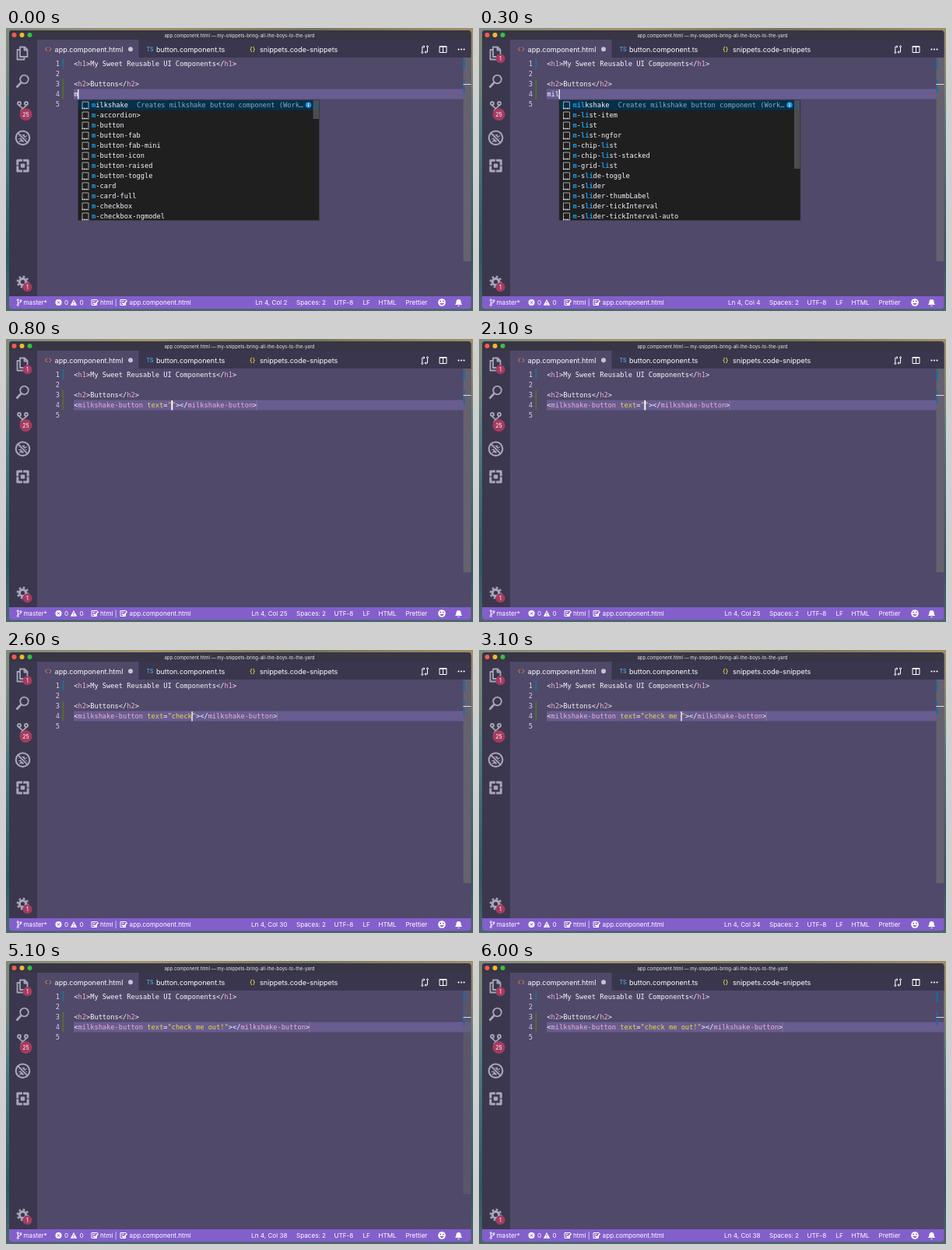
These frames come from a looping animation (600x364 px, 6100 ms). An HTML page:

```html
<!DOCTYPE html>
<html lang="en">
<head>
<meta charset="utf-8">
<title>Snippet typing</title>
<style>
  html, body { margin: 0; width: 100%; height: 100%; overflow: hidden; background: #39364b; }
  svg { display: block; width: 600px; height: 364px; }
  text { font-family: Inter, "Open Sans", sans-serif; fill: #fff; white-space: pre; }
  .code text, text.code { font: 8.68px "DejaVu Sans Mono", "Liberation Mono", monospace; fill: #f8f6fc; }
  .tabs text { font-size: 9px; }
  .status text { font-size: 8.15px; }
  .num text { fill: #d8d3e6; text-anchor: end; }
  .num .now { fill: #c9bdf0; }
  .tag { fill: #eeaed0; }
  .attr, .str { fill: #e8d740; }
  .hit { fill: #1c9be8; font-weight: bold; }
  .detail { fill: #86acc4 !important; }
  .icon { fill: none; stroke: #aaa6b8; stroke-width: 1.8; stroke-linejoin: round; }
  .thin { fill: none; stroke: #fff; stroke-width: 1; }
  .badge circle { fill: #a53b60; }
  .badge text { font-size: 7px; text-anchor: middle; }
</style>
</head>
<body>
<svg viewBox="0 0 600 364">
  <defs>
    <linearGradient id="sand" x2="1">
      <stop offset="0" stop-color="#7d8a78"/><stop offset=".3" stop-color="#a3936c"/>
      <stop offset=".65" stop-color="#757457"/><stop offset="1" stop-color="#a08f66"/>
    </linearGradient>
    <linearGradient id="sea" x2="0" y2="1">
      <stop offset="0" stop-color="#6f8780" stop-opacity="0"/><stop offset=".35" stop-color="#507b7e"/>
      <stop offset=".8" stop-color="#2b5960"/><stop offset="1" stop-color="#4d666e"/>
    </linearGradient>
    <clipPath id="win"><rect x="4" y="3" width="593.5" height="358" rx="4"/></clipPath>
    <g id="check" class="thin"><path d="M4 -3.5H-3.5V3.5H3V1M-2 -1.5H1M-2 1H-.5"/><path d="M-1 .5L1 2.5 5 -2.5" stroke-width="1.6"/></g>
    <g id="snip" fill="none" stroke="#e8e8e8"><path d="M.5 8V.5H8.5V8" stroke-dasharray="1.4 .7"/><path d="M0 9H9" stroke-width="1.5" stroke-dasharray="2 .6"/></g>
  </defs>
  <rect width="600" height="364" fill="url(#sand)"/>
  <rect width="600" height="364" fill="url(#sea)"/>

  <g clip-path="url(#win)">
    <rect width="600" height="364" fill="#504969"/>
    <rect width="600" height="15" fill="#383545"/>
    <rect x="170.5" y="15" width="430" height="23" fill="#3a364e"/>
    <rect y="15" width="40" height="331" fill="#3b374e"/>
    <rect y="345" width="600" height="19" fill="#835fcb"/>
  </g>
  <circle cx="10.5" cy="9" r="3" fill="#f45b53"/>
  <circle cx="20.5" cy="9" r="3" fill="#f3b92f"/>
  <circle cx="30.5" cy="9" r="3" fill="#35c143"/>
  <text x="300" y="11.6" font-size="6" text-anchor="middle" style="fill:#e9e7ee">app.component.html — my-snippets-bring-all-the-boys-to-the-yard</text>

  <g class="tabs">
    <path d="M53 24.5L50.5 27.2 53 30M55.5 24.5L58 27.2 55.5 30" fill="none" stroke="#e08a4a"/>
    <text x="62.6" y="30.5">app.component.html</text>
    <circle cx="160" cy="27.3" r="3" fill="#c6c2d2"/>
    <text x="180.5" y="30" style="font-size:7px;font-weight:600;fill:#4f9fd0">TS</text>
    <text x="193" y="30.5">button.component.ts</text>
    <text x="313" y="30" style="font-size:8px;font-weight:600;fill:#d8c844">{}</text>
    <text x="326" y="30.5">snippets.code-snippets</text>
  </g>
  <g class="thin">
    <path d="M537.5 24H534.8V30.5M538.5 31H541.5V25M536.5 22.5L538 24 536.5 25.5M539.5 29.5L538 31 539.5 32.5"/>
    <circle cx="534.8" cy="31.5" r="1"/><circle cx="541.5" cy="23.8" r="1"/>
    <path d="M557 23.5H566V31.5H557ZM561.5 23.5V31.5M557 24.2H566"/>
  </g>
  <g fill="#fff"><circle cx="581.5" cy="27.5" r="1.1"/><circle cx="585" cy="27.5" r="1.1"/><circle cx="588.5" cy="27.5" r="1.1"/></g>

  <g class="icon">
    <path d="M18 24.5H24L27.5 28V37H18ZM18 28H14.5V40.5H23.5V37M23.5 24.5V28.5H27.5"/>
    <circle cx="23.5" cy="66" r="5.3"/><path d="M19.5 70L13.5 76.5" stroke-width="2.6"/>
    <circle cx="17" cy="97" r="2"/><circle cx="26" cy="97" r="2"/><circle cx="21.5" cy="107" r="2"/>
    <path d="M17 99C17 102 21.5 101 21.5 105M26 99C26 102 21.5 101 21.5 105"/>
    <ellipse cx="21.5" cy="141.8" rx="2.4" ry="4" fill="#aaa6b8"/>
    <path d="M16 138.5L19 140M16 142.5H19M17 146.5L19.5 144.5M27 138.5L24 140M27 142.5H24M19.5 136.5L20.5 138M23.5 136.5L22.5 138" stroke-width="1.1"/>
    <path d="M15.8 135.5L27.2 147.1" stroke="#3b374e" stroke-width="4"/>
    <path d="M15.3 135L27.7 147.6"/><circle cx="21.5" cy="141.3" r="8.8" stroke-width="2.1"/>
    <path d="M14.8 170.3H28.2V184H14.8Z" stroke-width="3"/>
    <path d="M21.5 168V173M21.5 181V186M13 177H17M26 177H30" stroke="#3b374e" stroke-width="1.2"/>
    <path d="M20 175.6H23V178.6H20Z" fill="#aaa6b8" stroke-width="2.4"/>
    <circle cx="21.5" cy="326.5" r="4.2" stroke-width="3.2"/>
    <circle cx="21.5" cy="326.5" r="6.8" stroke-width="2.2" stroke-dasharray="2.7 2.64"/>
  </g>
  <g class="badge">
    <g id="dirty"><circle cx="27.5" cy="39.2" r="6"/><text x="27.5" y="41.8">1</text></g>
    <circle cx="25.5" cy="111.2" r="8"/><text x="25.5" y="113.8">25</text>
    <circle cx="27.5" cy="333.3" r="6"/><text x="27.5" y="335.9">1</text>
  </g>

  <rect x="87" y="78.5" width="510" height="13" fill="#685c90"/>
  <rect id="slider" x="587.5" y="38" width="10" height="262" fill="#66616f"/>
  <path d="M588.5 40V53" stroke="#146cae" stroke-width="2"/>
  <path d="M588.5 66V71M588.5 75V83" stroke="#146cae" stroke-width="2"/>
  <path d="M587.5 72.5H597.5" stroke="#dddae4"/>
  <path d="M73.3 39V52" stroke="#216f92" stroke-width="1.8"/>
  <path d="M73.3 65.5V91.5" stroke="#566d2c" stroke-width="1.8"/>
  <g class="code num" id="nums"></g>
  <g class="code">
    <text x="87.3" y="48.7">&lt;<tspan class="tag">h1</tspan>&gt;My Sweet Reusable UI Components&lt;/<tspan class="tag">h1</tspan>&gt;</text>
    <text x="87.3" y="74.9">&lt;<tspan class="tag">h2</tspan>&gt;Buttons&lt;/<tspan class="tag">h2</tspan>&gt;</text>
    <text x="87.3" y="88" id="line"></text>
  </g>
  <rect id="stop" y="79" width=".8" height="12.3" fill="#8a80aa"/>
  <rect id="caret" y="79" height="12.5" fill="#fff"/>
  <g id="popup"></g>

  <g class="status">
    <g class="thin"><circle cx="15.3" cy="349.8" r="1.1"/><circle cx="15.3" cy="356.3" r="1.1"/><circle cx="19" cy="350.8" r="1.1"/><path d="M15.3 351V355M19 352C19 354 15.3 353 15.3 355"/></g>
    <text x="22.5" y="356">master*</text>
    <circle cx="67.5" cy="353" r="4" fill="#fff"/><path d="M65.8 351.3L69.2 354.7M69.2 351.3L65.8 354.7" stroke="#835fcb"/>
    <text x="75" y="356">0</text>
    <path d="M87 349L91.2 356.7H82.8Z" fill="#fff"/><path d="M87 351.5V354M87 355V356" stroke="#835fcb"/>
    <text x="94.5" y="356">0</text>
    <use href="#check" x="113.5" y="353"/><text x="121" y="356">html |</text>
    <use href="#check" x="150.5" y="353"/><text x="158.6" y="356">app.component.html</text>
    <text x="361.5" y="356" text-anchor="end" id="pos"></text>
    <text x="373" y="356">Spaces: 2</text>
    <text x="421.5" y="356">UTF-8</text>
    <text x="458.5" y="356">LF</text>
    <text x="478.5" y="356">HTML</text>
    <text x="513.5" y="356">Prettier</text>
    <circle cx="560" cy="353" r="4.8" fill="#fff"/>
    <g fill="#835fcb"><circle cx="558.2" cy="351.5" r=".9"/><circle cx="561.8" cy="351.5" r=".9"/><path d="M557 354H563Q560 358.3 557 354Z"/></g>
    <path d="M577 356Q578.5 354.5 578.5 352 578.5 349 581.5 349 584.5 349 584.5 352 584.5 354.5 586 356ZM580 357H583L581.5 358.3Z" fill="#fff"/>
  </g>
</svg>
<script>
const LOOP = 6100, LEFT = 87.3, CHAR = 5.225, EXPAND = 700;
const FADE = 4700, FADE_TIME = 800;
const $ = id => document.getElementById(id);

const words = ['m', 'mi', 'mil'];
const wordTimes = [0, 100, 200];
const message = 'check me out!';
const messageTimes = [...message].map((c, i) => i < 9 ? 2200 + i * 100 : i < 12 ? 2300 + i * 100 : 4400);

const wide = ['milkshake', 'm-accordion>', 'm-button', 'm-button-fab', 'm-button-fab-mini', 'm-button-icon',
  'm-button-raised', 'm-button-toggle', 'm-card', 'm-card-full', 'm-checkbox', 'm-checkbox-ngmodel'];
const narrow = ['milkshake', 'm-list-item', 'm-list', 'm-list-ngfor', 'm-chip-list', 'm-chip-list-stacked',
  'm-grid-list', 'm-slide-toggle', 'm-slider', 'm-slider-thumbLabel', 'm-slider-tickInterval', 'm-slider-tickInterval-auto'];
const hits = { m: /^m/, mi: /^mi|^m|i(?=st|d)/g, mil: /^mil|^m|li(?=st|d)/g };

const span = (cls, s) => `<tspan class="${cls}">${s}</tspan>`;
const esc = s => s.replace(/>/g, '&gt;');

$('nums').innerHTML = [1, 2, 3, 4, 5].map(n =>
  `<text x="69" y="${48.6 + (n - 1) * 13.12}"${n === 4 ? ' class="now"' : ''}>${n}</text>`).join('');

function popup(word) {
  const first = word === 'm';
  const rows = (first ? wide : narrow).map((s, i) =>
    `<use href="#snip" x="5.5" y="${2.5 + i * 13}"/>
     <text class="code" x="18" y="${10.2 + i * 13}">${esc(s).replace(hits[word], m => span('hit', m))}</text>`).join('');
  return `<rect x=".5" y=".5" width="310" height="155" fill="#1f1f20" stroke="#3d3b45" stroke-width=".8"/>
    <rect x="1" y="1" width="309" height="12.6" fill="#062f49"/>
    <rect x="302.5" y="1" width="7.5" height="${first ? 24 : 88}" fill="#6b6b6e" opacity=".6"/>${rows}
    <text class="code detail" x="76" y="10.2">Creates milkshake button component (Work…</text>
    <circle cx="296.5" cy="7" r="3.8" fill="#2490dc"/>
    <path d="M296.5 6.3V9.2M296.5 4.5V5.5" stroke="#fff"/>`;
}

let shown = '';
function draw(t) {
  $('slider').setAttribute('opacity', Math.min(1, Math.max(0, 1 - (t - FADE) / FADE_TIME)));

  const open = t < EXPAND;
  const wordCount = wordTimes.filter(k => k <= t).length;
  const typed = messageTimes.filter(k => k <= t).length;
  const word = words[wordCount - 1];
  const lastKey = open ? wordTimes[wordCount - 1] : typed ? messageTimes[typed - 1] : 800;
  const lit = open || t < lastKey || Math.floor((t - lastKey) / 500) % 2 === 0;
  const key = [open, wordCount, typed, lit].join();
  if (key === shown) return;
  shown = key;

  const col = open ? wordCount : 24 + typed;
  const x = LEFT + col * CHAR;
  const tag = span('tag', 'milkshake-button');
  $('line').innerHTML = open ? word
    : `&lt;${tag} ${span('attr', 'text')}=${span('str', `"${message.slice(0, typed)}"`)}&gt;&lt;/${tag}&gt;`;
  $('pos').textContent = `Ln 4, Col ${col + 1}`;
  $('caret').setAttribute('x', x - .4);
  $('caret').setAttribute('width', !open && !typed ? 1.9 : 1.3);
  $('caret').style.display = lit ? '' : 'none';
  $('stop').setAttribute('x', LEFT + (45 + typed) * CHAR - .8);
  $('stop').style.display = open ? 'none' : '';
  $('dirty').style.display = wordCount < 2 ? 'none' : '';
  $('popup').innerHTML = open ? popup(word) : '';
  $('popup').setAttribute('transform', `translate(${x - .5} 92)`);
}

const start = performance.now();
function tick() {
  draw((performance.now() - start) % LOOP);
  requestAnimationFrame(tick);
}
tick();
</script>
</body>
</html>
```
